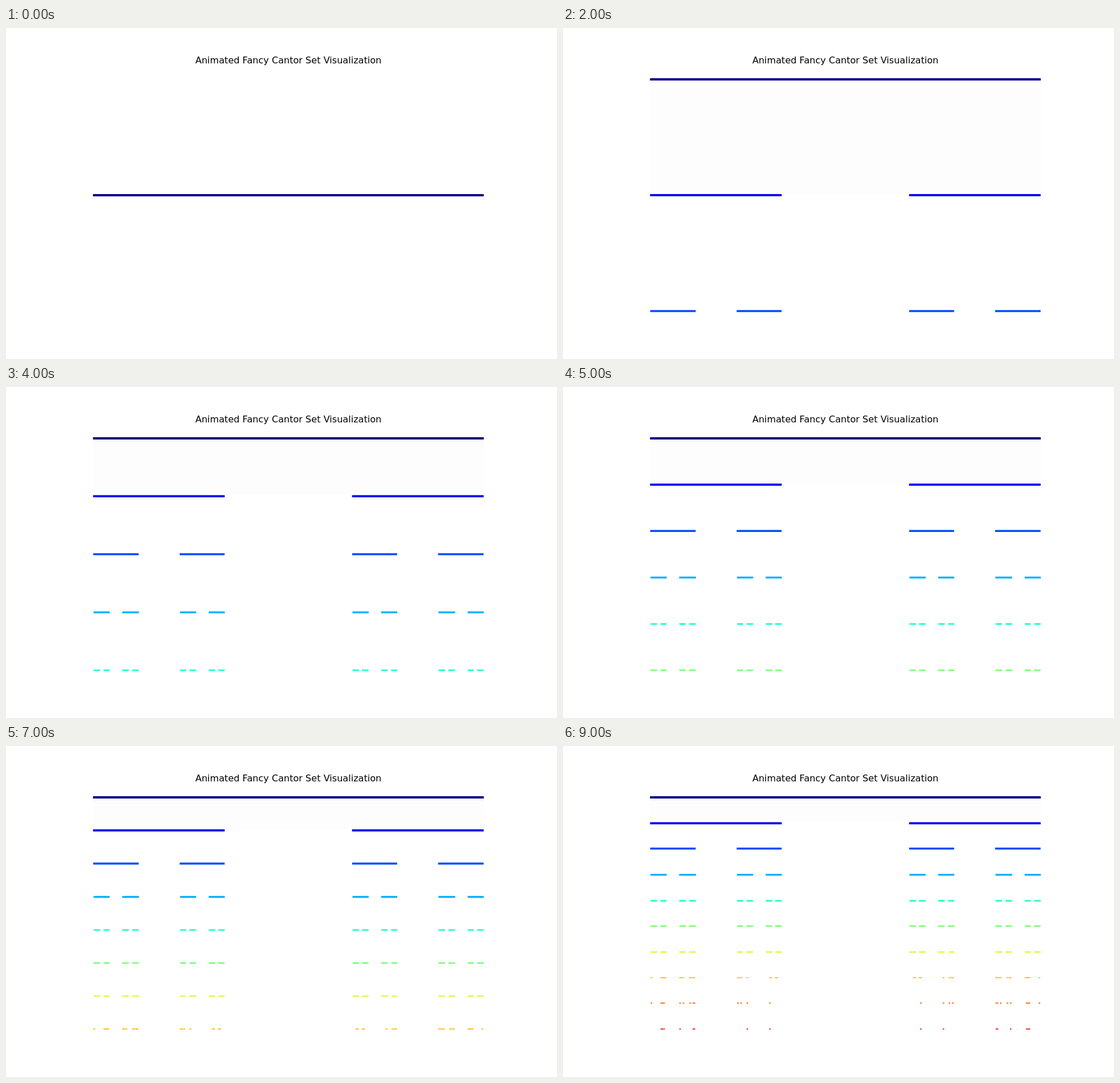
Write an HTML page that moves like this. It is 966x580 px and loops after 10000 ms.

```html
<!DOCTYPE html>
<html lang="en">
<head>
<meta charset="utf-8">
<title>Cantor Set</title>
<style>
  html, body { margin: 0; width: 100%; height: 100%; overflow: hidden; background: #fff; }
  svg { display: block; width: 966px; height: 580px; }
  path { fill: none; stroke-linecap: square; }
  text { font: 16.667px "DejaVu Sans", sans-serif; text-anchor: middle; }
</style>
</head>
<body>
<svg viewBox="0 0 1000 600" preserveAspectRatio="none">
  <rect id="panel" x="157.9" y="90" width="709.6" fill="#fdfdfd"/>
  <g id="rows"></g>
  <text x="512.5" y="64">Animated Fancy Cantor Set Visualization</text>
</svg>
<script>
const STEP = 1000;
const LEFT = 160.22727, WIDTH = 704.54545, TOP = 93, HEIGHT = 420;
const COLORS = ['#00007f', '#0000f1', '#004cff', '#00b0ff', '#29ffce',
                '#7dff7a', '#ceff29', '#ffc400', '#ff6800', '#f10800'];
const COUNT = COLORS.length;
const panel = document.getElementById('panel');
const group = document.getElementById('rows');

const snap = v => Math.floor(v + 0.5 + 1e-7);
const lineWidth = i => (3 - 0.2 * i) * 100 / 72;

// Start points of the Cantor intervals at a given depth, in 0..1
function starts(depth) {
  let list = [0];
  for (let i = 1; i <= depth; i++) {
    list = list.flatMap(s => [s, s + 2 / 3 ** i]);
  }
  return list;
}

// Ends sit on the pixel grid; intervals that collapse to a point vanish
function rowPath(depth, offset) {
  const len = 1 / 3 ** depth;
  return starts(depth).map(s => {
    const a = snap(LEFT + WIDTH * s);
    const b = snap(LEFT + WIDTH * (s + len));
    return a === b ? '' : `M${a + offset} 0H${b + offset}`;
  }).join('');
}

const rows = COLORS.map((color, i) => {
  const width = lineWidth(i);
  const offset = snap(width) % 2 / 2;
  const el = document.createElementNS('http://www.w3.org/2000/svg', 'path');
  el.setAttribute('d', rowPath(i, offset));
  el.setAttribute('stroke', color);
  el.setAttribute('stroke-width', width);
  group.appendChild(el);
  return { el, offset };
});

const rowY = (i, n) => snap(TOP + HEIGHT * (n ? i / n : 0.5));

function draw(n) {
  rows.forEach(({ el, offset }, i) => {
    el.style.display = i <= n ? '' : 'none';
    el.setAttribute('transform', `translate(0 ${rowY(i, n) + offset})`);
  });
  const bottom = rowY(1, n) + (n === 1 ? 2 : -2);
  panel.setAttribute('height', n ? bottom - 90 : 0);
}

let shown = -1;
const begin = performance.now();
function tick() {
  const n = Math.floor((performance.now() - begin) / STEP) % COUNT;
  if (n !== shown) draw(shown = n);
  requestAnimationFrame(tick);
}
tick();
</script>
</body>
</html>
```
